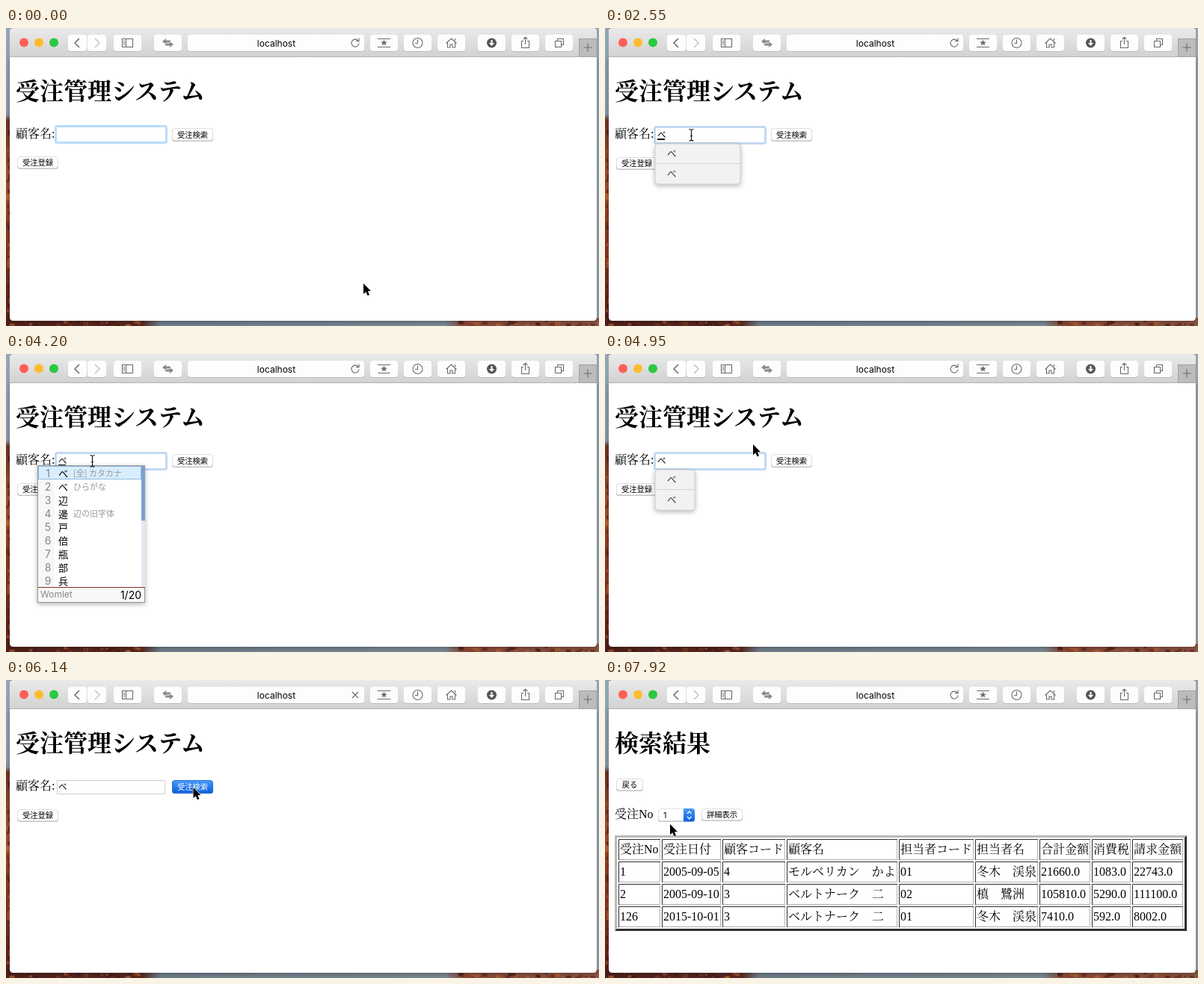
Write an HTML page that moves like this. It is 793 by 399 pixels and loops after 8 s.

```html
<!DOCTYPE html>
<html lang="ja">
<head>
<meta charset="utf-8">
<style>
html, body { margin: 0; width: 100%; height: 100%; overflow: hidden; }
svg { display: block; }
.mincho { font-family: "Liberation Serif", "Noto Serif CJK JP", "Noto Sans CJK JP", serif; }
.ui { font-family: "Noto Sans CJK JP", "Noto Sans CJK", sans-serif; }
.bar { font-family: Inter, Roboto, sans-serif; }
.icon { fill: none; stroke: #6a6a6a; stroke-width: 1.1; }
.solid { fill: #6a6a6a; stroke: none; }
</style>
</head>
<body>
<svg id="stage" width="793" height="399" viewBox="0 0 793 399">
  <defs>
    <linearGradient id="sky" x2="0" y2="1">
      <stop offset="0" stop-color="#93a5b6"/><stop offset=".29" stop-color="#8799aa"/>
      <stop offset=".31" stop-color="#6b3226"/><stop offset=".5" stop-color="#a4532f"/>
      <stop offset=".75" stop-color="#7c3020"/><stop offset="1" stop-color="#4c1d18"/>
    </linearGradient>
    <linearGradient id="ground">
      <stop offset="0" stop-color="#4f201b"/><stop offset=".23" stop-color="#5b2a22"/>
      <stop offset=".26" stop-color="#6f7f8c"/><stop offset=".74" stop-color="#7b8a96"/>
      <stop offset=".77" stop-color="#8a4a38"/><stop offset="1" stop-color="#8d5544"/>
    </linearGradient>
    <linearGradient id="toolbar" x2="0" y2="1">
      <stop offset="0" stop-color="#ebeaeb"/><stop offset="1" stop-color="#d3d2d3"/>
    </linearGradient>
    <linearGradient id="blue" x2="0" y2="1">
      <stop offset="0" stop-color="#4a9bf8"/><stop offset="1" stop-color="#0a5fe0"/>
    </linearGradient>
    <filter id="shade" x="-30%" y="-30%" width="160%" height="160%">
      <feDropShadow dx="0" dy="2" stdDeviation="3" flood-opacity=".3"/>
    </filter>
  </defs>
</svg>
<script>
const stage = document.getElementById('stage');
const LOOP = 8000;

const text = (x, y, str, size, cls, attrs = '') =>
  `<text x="${x}" y="${y}" font-size="${size}" class="${cls}" ${attrs}>${str}</text>`;
const rect = (x, y, w, h, fill, attrs = '') =>
  `<rect x="${x}" y="${y}" width="${w}" height="${h}" fill="${fill}" ${attrs}/>`;
const path = (d, attrs = 'class="icon"') => `<path d="${d}" ${attrs}/>`;
const group = (id, body, attrs = '') => `<g id="${id}" ${attrs}>${body}</g>`;

function pushButton(x, y, w, h, label, pressed) {
  return rect(x, y + 1, w, h, pressed ? '#0a55c8' : '#c4c4c4', 'rx="3.5"') +
    rect(x + .5, y + .5, w - 1, h - 1, pressed ? 'url(#blue)' : '#fff',
      `rx="3.5" stroke="${pressed ? '#2b74dd' : '#dedede'}"`) +
    text(x + w / 2, y + h / 2 + 4.3, label, 10.3, 'ui',
      `font-weight="500" text-anchor="middle" fill="${pressed ? '#fff' : '#000'}"`);
}

function desktop() {
  let seed = 7;
  const rnd = () => (seed = seed * 16807 % 2147483647) / 2147483647;
  const tones = ['#c0693a', '#3a1714', '#8f3d26', '#5d241b'];
  let out = rect(0, 0, 793, 399, 'url(#ground)') + rect(0, 0, 6, 399, 'url(#sky)') +
    rect(789, 0, 4, 388, '#94a3b1');
  for (let i = 0; i < 110; i++) {
    const fill = tones[i % 4], size = 1.5 + rnd() * 3;
    if (i < 40) out += rect(rnd() * 4, 122 + rnd() * 270, size, size * 2, fill, 'opacity=".6"');
    else {
      const x = i < 80 ? rnd() * 185 : 605 + rnd() * 185;
      out += rect(x, 392 + rnd() * 5, size * 1.6, size, fill, 'opacity=".6"');
    }
  }
  return out;
}

function toolbar() {
  const keys = [[83, 25], [109, 25], [144, 37], [198, 37], [243, 236], [487, 37],
    [532, 37], [577, 37], [631, 37], [676, 37], [721, 37]];
  let out = path('M5 38V4Q5 0 9 0H786Q790 0 790 4V38Z', 'fill="url(#toolbar)"') +
    rect(5, 38, 785, 1, '#b3b1b3');
  ['#fc5f57', '#fdbc2e', '#29c941'].forEach((c, i) => {
    out += `<circle cx="${24 + 20 * i}" cy="19.5" r="6" fill="${c}"/>`;
  });
  for (const [x, w] of keys)
    out += rect(x, 10, w, 22, '#bebcbe', 'rx="4"') + rect(x, 9, w, 22, '#fdfdfd', 'rx="4"');
  out += text(361.5, 25, 'localhost', 12, 'bar', 'text-anchor="middle"');
  out += path('M98 14l-6 6 6 6', 'class="icon" style="stroke-width:1.5"') +
    path('M119 14l6 6-6 6', 'class="icon" style="stroke:#c4c4c4;stroke-width:1.5"');
  out += path('M155.5 14.5h14v11h-14zM160.5 14.5v11M157 17.5h2M157 19.5h2M157 21.5h2');
  out += path('M209 18l5-4v2.5h6v3h-6V22zM224 22l-5-4v2.5h-6v3h6V26z', 'fill="#8a8a8a"');
  out += path('M497 14.5h17M497 25.5h17') +
    path('M505.5 15.5l1.2 3h3.2l-2.5 2 1 3.1-2.9-1.9-2.9 1.9 1-3.1-2.5-2h3.2z', 'class="solid"');
  out += '<circle cx="550.5" cy="20" r="6.5" class="icon"/>' + path('M550.5 15.5v5h-3.5');
  out += path('M588.5 20.5l7-6.5 7 6.5M590.5 19.5v6.5h3.5v-4h3v4h3.5v-6.5M600.5 14v3');
  out += '<circle cx="649.5" cy="20" r="6.5" fill="#555"/>' +
    path('M648.5 16h2v4h2.6l-3.6 4-3.6-4h2.6z', 'fill="#fff"');
  out += path('M692 17.5h-2.5v9h10v-9H697M694.5 22v-9.5M691.7 15l2.8-2.8 2.8 2.8');
  out += path('M737.5 17.5v-3h8v8h-3M734.5 17.5h8v8h-8z');
  out += rect(766.5, 14.5, 23.5, 24, '#bdbcbd', 'stroke="#a3a2a3"') +
    path('M772.5 26h11M778 20.5v11');
  out += rect(458, 12, 18, 16, '#fdfdfd') +
    group('reload', path('M471.3 17.5A5 5 0 1 0 472 20.5M472 13.5v4.2h-4.2')) +
    group('stop', path('M463 16l8 8M471 16l-8 8'));
  return out;
}

function searchPage() {
  const field = group('ring', rect(66.5, 131.5, 148, 22, 'none', 'rx="2" stroke-width="3"')) +
    group('plain', rect(68.5, 133.5, 144, 18, '#fff', 'stroke="#cdcdcd"'));
  return text(13, 96, '受注管理システム', 32, 'mincho', 'font-weight="700"') +
    text(13, 147, '顧客名:', 16, 'mincho') +
    group('field', field) +
    group('typed', text(70, 147, '', 11.5, 'ui', 'font-weight="500"')) +
    group('underline', rect(70, 148, 10, 2, '#111')) +
    group('caret', rect(0, 136, 1, 13, '#222')) +
    group('idle', pushButton(222, 134, 55, 17, '受注検索')) +
    group('pressed', pushButton(222, 134, 55, 17, '受注検索', true)) +
    group('register', pushButton(15, 172, 55, 16, '受注登録'));
}

const suggestions = group('suggest',
  rect(67, 155, 53, 54, '#f2f2f2', 'id="panel" rx="4" stroke="#c2c2c2" stroke-width=".8" filter="url(#shade)"') +
  rect(67, 181, 53, 1, '#d2d2d2', 'id="divider"') +
  text(83, 172.5, 'ベ', 12.5, 'ui', 'fill="#333"') + text(83, 199.5, 'べ', 12.5, 'ui', 'fill="#333"'));

function candidates() {
  const notes = ['[全] カタカナ', 'ひらがな', '', '辺の旧字体'];
  let out = rect(42.5, 149.5, 143, 183, '#fff', 'stroke="#969696" filter="url(#shade)"') +
    rect(43, 150, 22, 162, '#f7f7f7') +
    rect(181, 150, 5, 162, '#e3e8f1') + rect(181, 150, 5, 73, '#7f9fce') +
    rect(43.5, 0, 137, 17, '#d8edfd', 'id="choice" stroke="#8fbce4"');
  [...'べべ辺邊戸倍瓶部兵'].forEach((word, i) => {
    const y = 164.5 + 18 * i;
    out += text(56, y, i + 1, 14, 'bar', 'text-anchor="middle" fill="#858585"') +
      text(70, y, i ? word : 'ベ', 13, 'ui', 'font-weight="500"') +
      text(90, y - .5, notes[i] || '', 11, 'ui', 'fill="#999"');
  });
  return group('ime', out + rect(43, 313, 142, 19, '#f8f8f8') + rect(43, 312, 143, 1, '#8c2f20') +
    text(46, 326, 'Womlet', 12, 'bar', 'fill="#858585"') +
    text(181, 328, '', 14, 'bar', 'id="count" text-anchor="end"'));
}

function resultPage() {
  const lefts = [18, 76, 157, 243, 393, 495, 581, 651, 705, 775];
  const rows = [
    '受注No,受注日付,顧客コード,顧客名,担当者コード,担当者名,合計金額,消費税,請求金額',
    '1,2005-09-05,4,モルベリカン　かよ,01,冬木　渓泉,21660.0,1083.0,22743.0',
    '2,2005-09-10,3,ベルトナーク　二,02,槙　鷺洲,105810.0,5290.0,111100.0',
    '126,2015-10-01,3,ベルトナーク　二,01,冬木　渓泉,7410.0,592.0,8002.0'];
  let out = text(13, 96, '検索結果', 32, 'mincho', 'font-weight="700"') +
    pushButton(15, 132, 36, 16, '戻る') +
    text(13, 185, '受注No', 16, 'mincho') +
    rect(71, 174, 49, 16, '#c4c4c4', 'rx="3.5"') +
    rect(71.5, 172.5, 48, 16, '#fff', 'rx="3.5" stroke="#dedede"') +
    path('M105 172h11.5q3.5 0 3.5 3.5v10.500q0 3.500-3.500 3.500H105z', 'fill="url(#blue)"') +
    path('M110 179l2.700-3 2.700 3M110 183l2.700 3 2.700-3', 'fill="none" stroke="#fff" stroke-width="1.2"') +
    text(78, 185, '1', 11, 'bar') +
    pushButton(129, 172, 55, 16, '詳細表示');
  out += path('M13 336V208H778l-3 3H16V333z', 'fill="#bababa"') +
    path('M778 208V336H13l3-3H775V211z', 'fill="#2e2e2e"');
  rows.forEach((row, r) => row.split(',').forEach((cell, c) => {
    const x = lefts[c], y = 213 + 30 * r, right = lefts[c + 1] - 2.5;
    out += path(`M${x + .5} ${y + 27.5}H${right}V${y + .5}`, 'fill="none" stroke="#b0b0b0"') +
      path(`M${x + .5} ${y + 28}V${y + .5}H${right + .5}`, 'fill="none" stroke="#2e2e2e"') +
      text(x + 2, y + 19, cell, 16, 'mincho');
  }));
  return out;
}

stage.insertAdjacentHTML('beforeend', desktop() +
  path('M5 38H790V387Q790 392 785 392H10Q5 392 5 387Z', 'fill="#fff" filter="url(#shade)"') +
  toolbar() + group('search', searchPage() + suggestions + candidates()) +
  group('result', resultPage()) +
  group('arrow', path('M0 0V14.200L3.300 11.200 5.500 16.300 8 15.200 5.800 10.200H10Z',
    'fill="#000" stroke="#fff" stroke-width="1.2" paint-order="stroke"')) +
  group('beam', path('M-3 -7.500Q0 -7.500 0 -5.500Q0 -7.500 3 -7.500M0 -6V6.500M-3 8Q0 8 0 6Q0 8 3 8M-1.500 1.500h3',
    'fill="none" stroke="#111" stroke-width="1.1"')));

// Each step holds until the next; values carry over.
const steps = [
  [0, { x: 478, y: 342, beam: 0, caret: 0, typed: '', line: 0, popup: 0, choice: 0,
    focus: 1, moved: 0, pressed: 0, loading: 0, result: 0 }],
  [150, { x: 440, y: 332 }],
  [300, { x: 350, y: 304 }],
  [450, { x: 262, y: 272, caret: 70 }],
  [750, { x: 205, y: 226 }],
  [900, { x: 156, y: 184 }],
  [1050, { x: 122, y: 154, caret: 0 }],
  [1200, { x: 115.5, y: 143, beam: 1 }],
  [1500, { caret: 70 }],
  [1950, { typed: 'ｂ', line: 1, moved: 1, caret: 82 }],
  [2100, { typed: 'べ', popup: 114 }],
  [2550, { typed: 'ベ', line: 2, caret: 0 }],
  [2700, { popup: 0 }],
  [3300, { typed: 'べ', choice: 2 }],
  [4200, { typed: 'ベ', choice: 1 }],
  [4500, { choice: 0, line: 0, caret: 82 }],
  [4950, { x: 198, y: 121, beam: 0, caret: 0, popup: 53 }],
  [5100, { x: 226, y: 98 }],
  [5240, { x: 254, y: 108 }],
  [5390, { x: 262, y: 130 }],
  [5540, { x: 250.5, y: 144 }],
  [5840, { pressed: 1, focus: 0, popup: 0 }],
  [6140, { loading: 1 }],
  [6440, { result: 1 }],
  [6590, { loading: 0 }],
  [7330, { x: 238, y: 172 }],
  [7480, { x: 196, y: 218 }],
  [7630, { x: 142, y: 236 }],
  [7780, { x: 102, y: 216 }],
  [7920, { x: 87, y: 193 }]
];

const el = id => document.getElementById(id);
const show = (id, on) => { el(id).style.display = on ? '' : 'none'; };
const put = (id, x, y) => el(id).setAttribute('transform', `translate(${x} ${y})`);

function draw(t) {
  const s = {};
  for (const [at, change] of steps) if (at <= t) Object.assign(s, change);
  show('search', !s.result);
  show('result', s.result);
  show('reload', !s.loading);
  show('stop', s.loading);
  show('arrow', !s.beam);
  show('beam', s.beam);
  put(s.beam ? 'beam' : 'arrow', s.x, s.y);
  show('caret', s.caret);
  put('caret', s.caret, 0);
  show('ring', s.focus);
  show('plain', !s.focus);
  el('ring').style.stroke = s.moved ? '#c3d9f3' : '#b9dcfb';
  put('field', 0, s.moved);
  put('register', 0, s.moved);
  el('typed').firstChild.textContent = s.typed;
  show('underline', s.line);
  el('underline').firstChild.setAttribute('height', s.line || 1);
  show('idle', !s.pressed);
  show('pressed', s.pressed);
  show('suggest', s.popup);
  for (const id of ['panel', 'divider']) el(id).setAttribute('width', s.popup);
  show('ime', s.choice);
  el('choice').setAttribute('y', 150.5 + 18 * (s.choice - 1));
  el('count').textContent = s.choice + '/20';
}

const start = performance.now();
function tick() {
  draw((performance.now() - start) % LOOP);
  requestAnimationFrame(tick);
}
tick();
</script>
</body>
</html>
```
